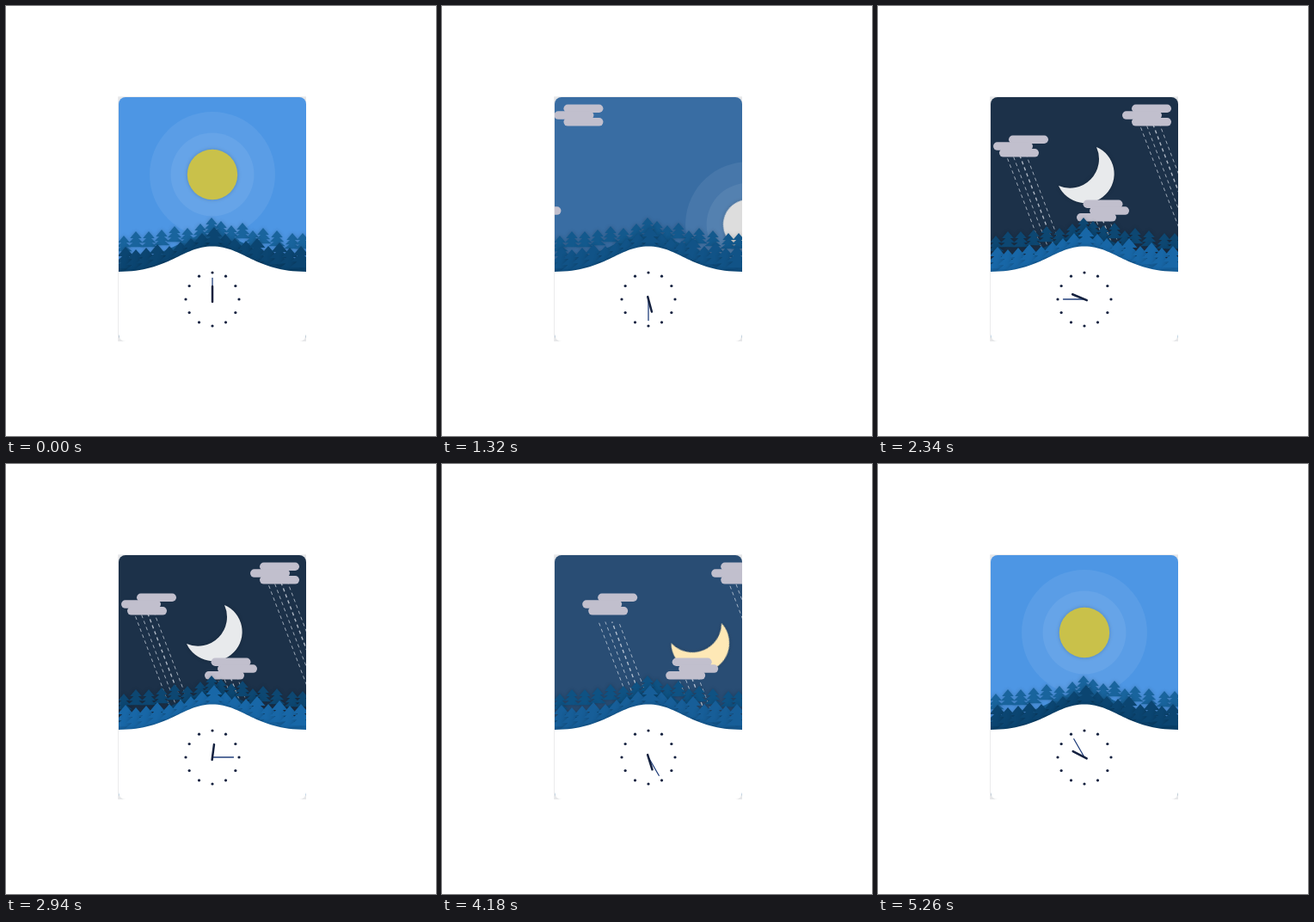
Recreate the animation shown at these times as an HTML page. Size 500x500 px, loop 5280 ms.

```html
<!DOCTYPE html>
<html lang="en">
<head>
<meta charset="utf-8">
<title>Day and night</title>
<style>
  html, body { margin: 0; width: 100%; height: 100%; overflow: hidden; background: #fff; }
  svg { display: block; width: 100vw; height: 100vh; }
  .lift { filter: drop-shadow(0 0 2px rgba(0, 0, 0, .2)); }
</style>
</head>
<body>
<svg viewBox="0 0 500 500">
  <defs>
    <clipPath id="card"><rect x="131" y="106" width="218" height="284" rx="8"/></clipPath>
    <path id="hill" d="M125 309H131C190 309 205 279.6 240 279.6C275 279.6 290 309 349 309H355V395H125Z"/>
  </defs>
  <rect x="130.2" y="105.3" width="218.8" height="284.7" fill="#e6e7e9"/>
  <g clip-path="url(#card)">
    <rect id="sky" x="131" y="106" width="218" height="210"/>
    <g id="sun">
      <circle cx="240" cy="196" r="73" fill="#fff" opacity=".07"/>
      <circle cx="240" cy="196" r="48.5" fill="#fff" opacity=".07"/>
      <circle id="disc" class="lift" cx="240" cy="196" r="29.2"/>
    </g>
    <path id="moon" class="lift" d="M254 164A33.8 33.8 0 1 1 210 209A33.8 33.8 0 0 0 254 164Z"/>
    <g id="clouds"></g>
    <g id="back"></g>
    <g id="front"></g>
    <use href="#hill" class="lift" fill="#fff"/>
    <g id="dots" fill="#14213f"></g>
    <path id="minute" d="M240 341V316.5" stroke="#23407c" stroke-width="1.3" stroke-linecap="round"/>
    <path id="hour" d="M240 344V326" stroke="#14213f" stroke-width="2.5" stroke-linecap="round"/>
  </g>
</svg>
<script>
const LOOP = 5280, STEP = 20, HOUR = 240;
const $ = id => document.getElementById(id);

function add(parent, tag, attrs) {
  const el = document.createElementNS('http://www.w3.org/2000/svg', tag);
  for (const key in attrs) el.setAttribute(key, attrs[key]);
  return parent.appendChild(el);
}

// Trees: tops as x, y pairs
function plant(layer, tops, size, lift) {
  add(layer, 'use', { href: '#hill', y: -lift });
  for (let i = 0; i < tops.length; i += 2) {
    let d = '';
    for (let k = 2; k >= 0; k--) {
      const w = size * (.75 + k * .17), y = tops[i + 1] + k * size * .58;
      d += `M${tops[i]} ${y}l${w} ${size * .88}h${-2 * w}Z`;
    }
    add(layer, 'path', { d, class: 'lift' });
  }
}
plant($('back'), [137,267, 151,262, 166,262, 181,260, 196,256, 211,258, 226,253, 250,250,
  262,255, 275,252, 287,261, 299,258, 315,261, 333,264, 345,264, 239,246], 9, 14);
plant($('front'), [139,280, 151,283, 163,281, 176,277, 190,279, 203,274, 215,270, 228,264,
  255,265, 266,270, 279,273, 292,270, 305,279, 318,275, 330,281, 343,279, 242,257], 12.5, 9);

// Clouds: row lefts, top edge, rain origin, rain start and stop
const clouds = [
  { rows: [152, 134, 141], y: 150.5, rx: 149.5, from: 1600, to: 4135 },
  { rows: [295, 284, 295], y: 114.5, rx: 304.5, from: 1710, to: 4200 },
  { rows: [238.5, 246, 231], y: 225.5, rx: 246, from: 1615, to: 4190 }
];
const SLANT = .38, FALL = .2;
for (const c of clouds) {
  c.base = c.y + 24;
  c.drops = [0, 1, 2, 3].map(i => add($('clouds'), 'path', {
    stroke: '#dfe5ee', 'stroke-opacity': .75,
    'stroke-width': i === 2 ? 1.4 : .9, 'stroke-dasharray': '4 3.5'
  }));
  const body = add($('clouds'), 'g', { fill: '#c1bfcd' });
  c.rows.forEach((x, i) =>
    add(body, 'rect', { x, y: c.y + i * 7.8, width: 46, height: 9.5, rx: 4.75 }));
}

for (let i = 0; i < 12; i++) {
  const a = i * Math.PI / 6;
  add($('dots'), 'circle', { cx: 240 + 31 * Math.sin(a), cy: 341 - 31 * Math.cos(a), r: 1.6 });
}

const tones = {
  sky: [[900, '#4d96e4'], [1680, '#28496c'], [2140, '#1c3149'], [3580, '#1c3149'],
    [4180, '#294d74'], [4980, '#4d96e4']],
  back: [[900, '#19649d'], [1680, '#0e4f80'], [2140, '#0d4772'], [3580, '#0d4772'],
    [4180, '#0f5283'], [4980, '#19649d']],
  front: [[900, '#0b4571'], [1680, '#175f9a'], [2140, '#1867a7'], [3580, '#1867a7'],
    [4180, '#175e98'], [4980, '#0b4571']],
  disc: [[300, '#c9c14a'], [900, '#dddddd'], [4700, '#dddddd'], [5180, '#c9c14a']],
  moon: [[1680, '#fde7b6'], [2240, '#e8eaec'], [3580, '#e8eaec'], [4140, '#fee8b6']]
};
const rgb = hex => [1, 3, 5].map(i => parseInt(hex.slice(i, i + 2), 16));
const clamp = v => Math.max(0, Math.min(1, v));

function tone(stops, t) {
  const i = stops.findIndex(s => t < s[0]);
  if (i === 0) return stops[0][1];
  if (i < 0) return stops[stops.length - 1][1];
  const [t0, a] = stops[i - 1], [t1, b] = stops[i], k = (t - t0) / (t1 - t0);
  const to = rgb(b);
  return `rgb(${rgb(a).map((v, j) => Math.round(v + (to[j] - v) * k))})`;
}

function ease(t, start) {
  const x = clamp((t - start) / 1201);
  return x < .5 ? 4 * x ** 3 : 1 - 4 * (1 - x) ** 3;
}

const spin = (id, deg) => $(id).setAttribute('transform', `rotate(${deg} 240 341)`);

function draw(t) {
  const turn = ease(t, 816) + ease(t, 3793);
  spin('sun', turn * 180);
  spin('moon', (turn - 1) * 180);
  $('clouds').setAttribute('transform', `translate(${(turn - 1) * 218} 0)`);
  for (const id in tones) $(id).setAttribute('fill', tone(tones[id], t));
  for (const c of clouds) {
    const head = Math.max(0, Math.min(130, (t - c.from) * FALL));
    const tail = Math.max(0, (t - c.to) * FALL);
    c.drops.forEach((p, i) => {
      const x = c.rx + i * 7.8;
      p.setAttribute('d', head > tail
        ? `M${x + tail * SLANT} ${c.base + tail}L${x + head * SLANT} ${c.base + head}` : '');
      p.setAttribute('stroke-dashoffset', tail * 1.07 - t * FALL + i * 2);
    });
  }
  spin('minute', t / HOUR * 360);
  spin('hour', t / HOUR * 30);
}

const begin = performance.now();
function frame() {
  const t = (performance.now() - begin) % LOOP;
  draw(Math.floor(t / STEP) * STEP);
  requestAnimationFrame(frame);
}
frame();
</script>
</body>
</html>
```
